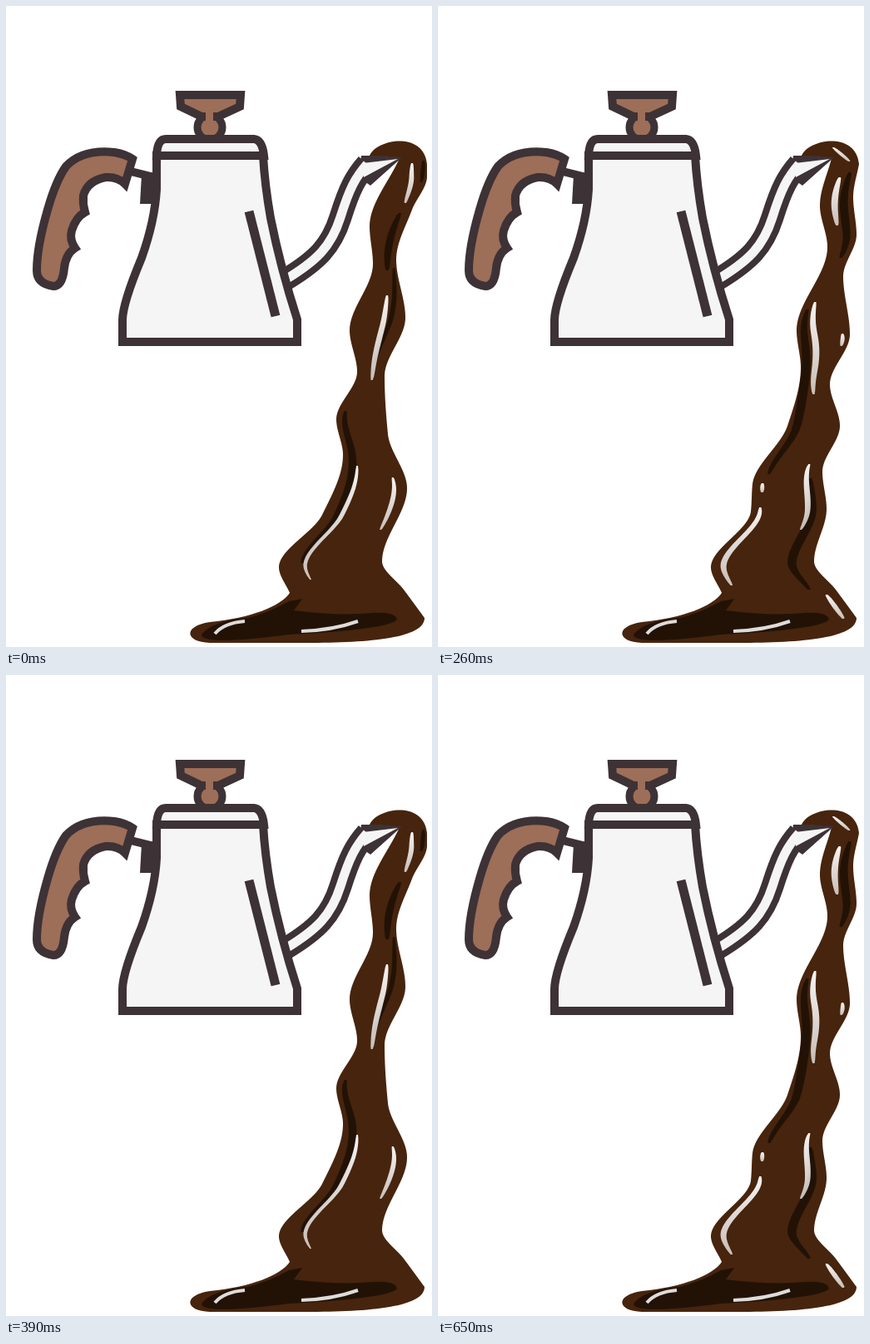
These frames come from a looping animation (512 px wide and 771 px high, 0.78 s). An HTML page with a canvas:

```html
<!DOCTYPE html>
<html lang="en">
<head>
<meta charset="utf-8">
<title>Pouring kettle</title>
<style>
html, body { margin: 0; width: 100%; height: 100%; overflow: hidden; background: #fff; }
canvas { display: block; width: 512px; height: 771px; }
</style>
</head>
<body>
<canvas id="stage"></canvas>
<script>
const W = 512, H = 771, HOLD = 130;
const INK = '#3d3236', WOOD = '#9d6e58', STEEL = '#f5f5f5';
const COFFEE = '#47240d', SHADE = '#221206';

const canvas = document.getElementById('stage');
const ctx = canvas.getContext('2d');
const dpr = window.devicePixelRatio || 1;
canvas.width = W * dpr;
canvas.height = H * dpr;

const pts = s => s.split(' ').map(p => p.split(',').map(Number));

// Smooth x(y) through the points, with no overshoot at the bulges
function edge(s) {
  const p = pts(s), n = p.length - 1;
  const d = p.slice(1).map(([x, y], i) => (x - p[i][0]) / (y - p[i][1]));
  const m = p.map((_, i) => {
    const a = d[Math.max(0, i - 1)], b = d[Math.min(n - 1, i)];
    return a * b > 0 ? 2 * a * b / (a + b) : 0;
  });
  return y => {
    if (y <= p[0][1]) return p[0][0];
    if (y >= p[n][1]) return p[n][0];
    const i = p.findIndex(q => q[1] > y) - 1;
    const h = p[i + 1][1] - p[i][1], t = (y - p[i][1]) / h, s = t * t * (3 - 2 * t);
    return p[i][0] + (p[i + 1][0] - p[i][0]) * s
      + h * t * (1 - t) * (m[i] * (1 - t) - m[i + 1] * t);
  };
}

// Each mark: [position across the stream at its top, at its bottom, top y, bottom y, width]
const poses = [
  {
    right: '506,190 506,205 488,245 469,305 480,375 455,445 459,515 482,580',
    left: '437,265 441,310 413,390 422,440 397,497 405,540 380,612',
    shade: [[.88, .87, 186, 212, 5], [.72, .6, 249, 318, 9], [.88, .6, 315, 430, 6], [.16, .22, 487, 670, 10]],
    shine: [[.5, .75, 189, 237, 6], [.62, .56, 348, 450, 7], [.26, .25, 553, 690, 6], [.81, .86, 567, 630, 6]]
  },
  {
    right: '511,192 506,213 471,290 465,335 475,395 457,445 466,500 444,555 464,630',
    left: '441,245 444,278 411,390 421,435 395,520 362,572 373,610',
    shade: [[.36, .2, 225, 388, 11], [.86, .83, 472, 570, 9], [.82, .88, 560, 685, 10], [.1, .2, 601, 658, 9]],
    shine: [[.65, .72, 174, 210, 6], [.48, .48, 223, 330, 5], [.15, .1, 424, 477, 7],
      [.71, .83, 539, 699, 8], [.11, .08, 657, 691, 8], [.95, .9, 720, 743, 7]]
  },
  {
    right: '506,190 499,230 503,275 487,325 495,395 471,455 483,505 462,560 467,605',
    left: '459,240 468,290 431,390 436,435 420,505 378,575 376,608',
    shade: [[.75, .65, 200, 303, 10], [.13, .2, 365, 563, 11], [.82, .77, 568, 702, 12]],
    shine: [[.06, .66, 170, 187, 6], [.46, .42, 206, 264, 8], [.25, .48, 356, 467, 8], [.86, .88, 394, 409, 5],
      [.77, .74, 551, 630, 7], [.14, .14, 574, 585, 5], [.12, .12, 603, 697, 8], [.89, .9, 708, 737, 7]]
  }
].map(p => ({
  ...p,
  right: edge(p.right + ' 452,668 478,702 503,736'),
  left: edge('473,183 ' + p.left + ' 328,675 341,706')
}));

function fill(points, color) {
  ctx.beginPath();
  points.forEach(([x, y]) => ctx.lineTo(x, y));
  ctx.fillStyle = color;
  ctx.fill();
}

// Brush mark that follows the flow between both edges
function mark({ left, right }, [u0, u1, y0, y1, width], color) {
  const a = [], b = [], steps = 30;
  for (let i = 0; i <= steps; i++) {
    const t = i / steps, y = y0 + (y1 - y0) * t, u = u0 + (u1 - u0) * t;
    const x = left(y) + (right(y) - left(y)) * u;
    const r = width / 2 * (.3 + .7 * Math.sqrt(Math.sin(Math.PI * t)));
    a.push([x - r, y]);
    b.unshift([x + r, y]);
  }
  fill(a.concat(b), color);
}

function fade(y0, y1) {
  const g = ctx.createLinearGradient(0, y0, 0, y1);
  g.addColorStop(0, 'rgba(255,255,255,.95)');
  g.addColorStop(1, 'rgba(255,255,255,.7)');
  return g;
}

function outlined(d, color, width = 10) {
  const path = new Path2D(d);
  ctx.fillStyle = color;
  ctx.fill(path);
  line(path, INK, width);
}

function line(path, color, width) {
  ctx.strokeStyle = color;
  ctx.lineWidth = width;
  ctx.stroke(path);
}

function drawCoffee(pose) {
  ctx.beginPath();
  ctx.moveTo(437, 180);
  ctx.bezierCurveTo(445, 160, 502, 150, pose.right(0), 190);
  for (let y = 190; y <= 736; y += 2) ctx.lineTo(pose.right(y), y);
  ctx.bezierCurveTo(503, 760, 440, 766, 360, 766);
  ctx.lineTo(245, 766);
  ctx.bezierCurveTo(215, 765, 212, 746, 245, 741);
  ctx.bezierCurveTo(295, 736, 330, 722, 341, 706);
  for (let y = 706; y >= 183; y--) ctx.lineTo(pose.left(y), y);
  ctx.fillStyle = COFFEE;
  ctx.fill();

  ctx.fillStyle = SHADE;
  ctx.fill(new Path2D(`M235 756 Q247 740 290 736 Q315 730 340 716 L356 713 L346 727
    Q400 734 440 730 Q468 728 470 738 Q460 750 340 756 Q235 770 235 756`));
  pose.shade.forEach(m => mark(pose, m, SHADE));
  pose.shine.forEach(m => mark(pose, m, fade(m[2], m[3])));
  line(new Path2D('M287 740 Q262 742 251 755 M355 752 Q392 751 423 740'), 'rgba(255,255,255,.85)', 4);
}

function drawKettle() {
  // Spout
  const spout = new Path2D('M336 329 C374 306 391 289 402 254 S420 206 434 190');
  line(spout, INK, 27);
  fill(pts('427,180 448,180 476,182 438,216 424,206'), INK);
  line(spout, STEEL, 11);
  fill(pts('429,189 446,187 471,184 441,200 430,206'), STEEL);

  // Handle
  line(new Path2D('M150 199 L178 206'), INK, 10);
  fill(pts('163,203 178,200 183,238 161,238'), INK);
  outlined(`M152 184 L143 214 Q134 205 120 206 Q98 210 93 228 Q92 238 95 248 Q84 254 79 270
    Q76 281 83 291 Q72 298 70 315 Q68 337 57 337 Q37 334 37 318 Q37 290 50 245
    Q60 210 72 193 Q92 172 130 176 Q143 178 152 184 Z`, WOOD);

  // Knob
  outlined('M230 146 A15 15 0 0 1 260 146 A15 15 0 0 1 230 146 Z', WOOD, 9);
  outlined('M209 107 H282 L281 121 L255 133 H235 L210 121 Z', WOOD);
  ctx.fillStyle = WOOD;
  ctx.fillRect(240, 126, 9, 14);

  // Body and lid
  outlined('M181 180 Q182 160 192 160 H298 Q308 161 310 180 Z', STEEL);
  outlined(`M181 180 V220 Q179 258 163 303 Q140 358 140 378 V404 H350 V377
    Q330 315 318 255 Q311 215 309 180 Z`, STEEL);
  line(new Path2D('M292 247 L324 373'), INK, 11);
}

function draw(pose) {
  ctx.setTransform(dpr, 0, 0, dpr, 0, 0);
  ctx.fillStyle = '#fff';
  ctx.fillRect(0, 0, W, H);
  drawCoffee(pose);
  drawKettle();
}

const start = performance.now();
function tick() {
  const step = Math.floor((performance.now() - start) / HOLD);
  draw(poses[step % poses.length]);
  requestAnimationFrame(tick);
}
tick();
</script>
</body>
</html>
```
